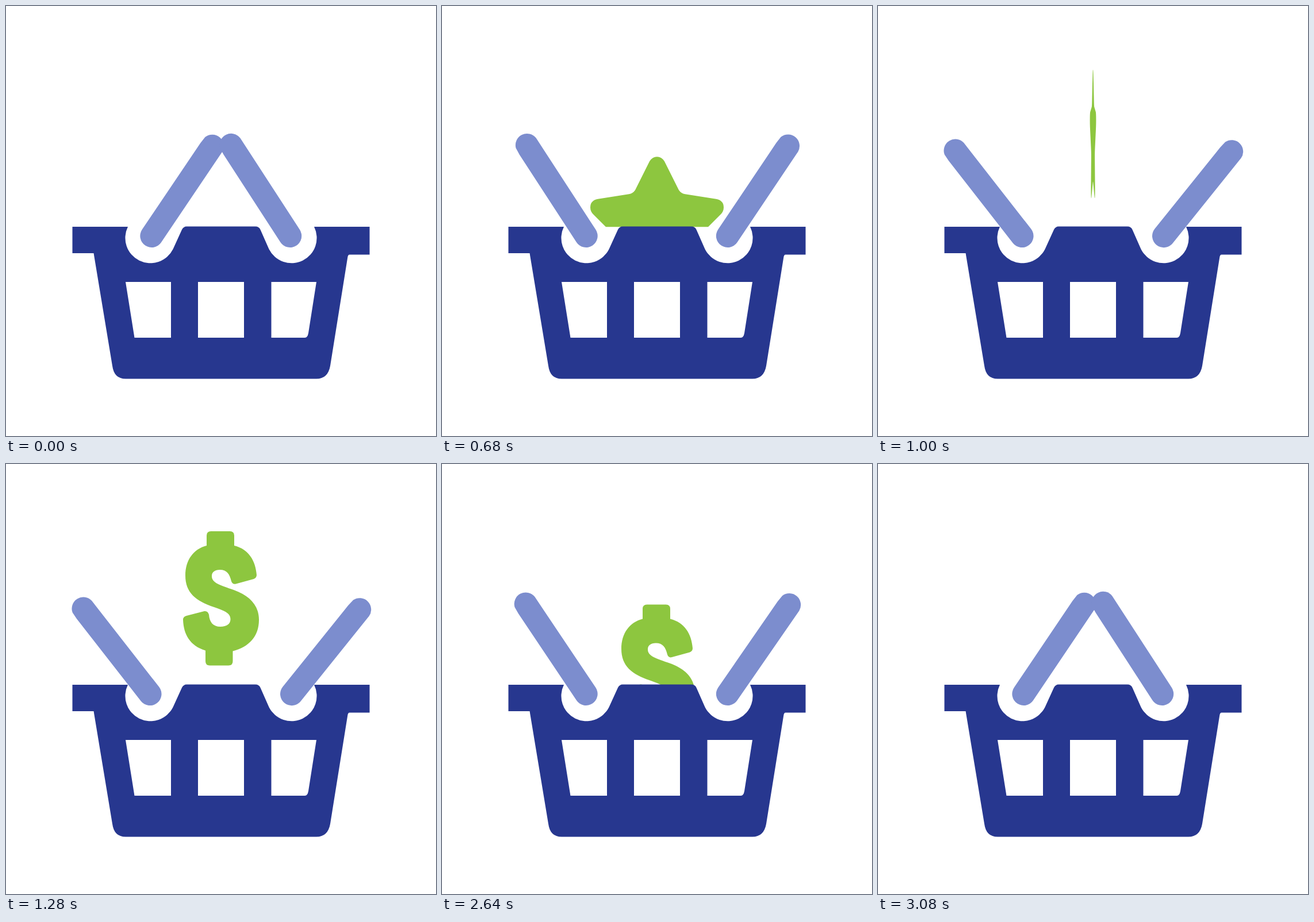
An HTML page for the animation above (3.92 s loop, 748x748 px).

```html
<!DOCTYPE html>
<html lang="en">
<head>
<meta charset="utf-8">
<title>Shopping basket</title>
<style>
  html, body { margin: 0; height: 100%; overflow: hidden; background: #fff; }
  svg { display: block; width: 100%; height: 100%; }
</style>
</head>
<body>
<svg viewBox="0 0 748 748">
  <defs>
    <clipPath id="aboveRim"><rect width="748" height="384.3"/></clipPath>
    <path id="bar" d="M-20 -2.4V-184L-19 -197A20 20 0 0 1 20 -192.4V-2.4A20 20 0 0 1 -20 -2.4Z"/>
  </defs>
  <g clip-path="url(#aboveRim)" fill="#8dc63f">
    <path id="star" d="M-13 8Q-8 0 0 0Q8 0 13 8L38 58Q42 64 49 65L103 73.500Q116 76 116 88Q116 95 111 100L72 139Q66 145 67 153L77 205Q78 229 57 222L6 196Q0 193 -6 196L-57 222Q-78 229 -77 205L-67 153Q-66 145 -72 139L-111 100Q-116 95 -116 88Q-116 76 -103 73.500L-49 65Q-42 64 -38 58Z"/>
    <g id="dollar">
      <path transform="translate(-374)" d="M397 142C422 148 434 168 436 193Q436 198 431 200L400 208.500Q394 210 392 204C389 191 384 184 372 184C363 184 358 188 358 195C358 207 373 211 396 219C424 229 440 246 440 271C440 300 423 318 394.500 325.500V343Q394.500 350.500 387 350.500H354.500Q347 350.500 347 343V324.500C320 316 309 297 308 271Q308 265.500 314 264L345 256Q351 255 353 262C354 275 360 283 373 283C384 283 390.500 278 390.500 270C390.500 259 379 255 362 249C330 238 312 224 312 194C312 167 326 148 349 142V124.500Q349 117 356.500 117H389.500Q397 117 397 124.500Z"/>
    </g>
  </g>
  <path fill="#27378f" fill-rule="evenodd" d="M115.500 384H212A43 43 0 0 0 290.500 423L306 389Q309 383.500 314 383.500H434Q440 383.500 442.500 389L457.500 423A43 43 0 0 0 536 384H632.500V432.500H597.500Q595 432.500 594.300 437L564 626Q560 648.500 540 648.500H208Q188 648.500 185 626L152.500 430H115.500Z
    M208 480H287V577H223.500Z M334 480H414V577H334Z M461.500 480H540L526 569Q524.500 577 520 577H461.500Z"/>
  <g fill="#7c8dce">
    <use id="leftBar" href="#bar"/>
    <use id="rightBar" href="#bar"/>
  </g>
</svg>
<script>
const LOOP = 3920, STEP = 40;
const [star, dollar, leftBar, rightBar] =
  ['star', 'dollar', 'leftBar', 'rightBar'].map(id => document.getElementById(id));

const ramp = (t, start, end) => Math.min(1, Math.max(0, (t - start) / (end - start)));
const smooth = u => u * u * (3 - 2 * u);
const easeInOut = u => u < .5 ? (2 * u) ** 2.5 / 2 : 1 - (2 - 2 * u) ** 2.5 / 2;
const quickOpen = u => 1 - (1 - u ** 1.5) ** 4.5;
const place = (el, x, y, rest) => el.setAttribute('transform', `translate(${x} ${y}) ${rest}`);

function draw(t) {
  const open = quickOpen(ramp(t, 340, 920)) - easeInOut(ramp(t, 2520, 3090));
  place(leftBar, 252, 402, `rotate(${34 - 72 * open})`);
  place(rightBar, 495.5, 402, `rotate(${-33 + 71.8 * open})`);

  // The star rises and turns edge-on, then the dollar sign turns into view and drops.
  const rise = smooth(ramp(t, 340, 1030));
  place(star, 374, 409 - 300 * rise, `scale(${1 - smooth(ramp(t, 800, 1030))} 1)`);
  const fall = smooth(ramp(t, 2460, 2860));
  place(dollar, 374, 300 * fall, `scale(${smooth(ramp(t, 1030, 1280))} 1)`);
}

const began = performance.now();
function tick() {
  const t = (performance.now() - began) % LOOP;
  draw(Math.floor(t / STEP) * STEP);
  requestAnimationFrame(tick);
}
tick();
</script>
</body>
</html>
```
